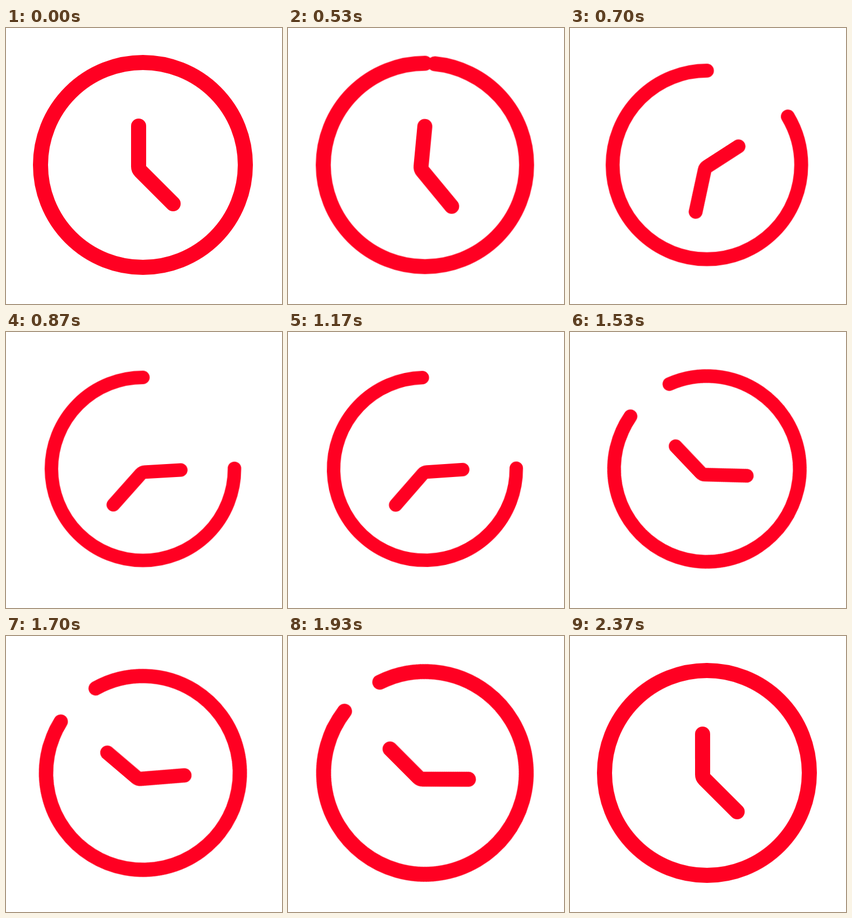
Write an HTML page that moves like this. It is 512 by 512 pixels and loops after 2.4 s.

```html
<!DOCTYPE html>
<html lang="en">
<head>
<meta charset="utf-8">
<title>Clock</title>
<style>
  html, body { margin: 0; width: 100%; height: 100%; overflow: hidden; background: #fff; }
  svg { display: block; width: 100%; height: 100%; }

  .clock {
    fill: none;
    stroke: #ff0022;
    stroke-width: 28px;
    stroke-linecap: round;
    stroke-linejoin: round;
  }
  .clock, .ring, .hands {
    transform-origin: 254px 254px;
    animation: 2400ms cubic-bezier(.833, 0, .167, 1) infinite;
  }
  .clock { animation-name: breathe; }
  .ring { stroke-dasharray: 360px 360px; animation-name: gap; }
  .hands { transform-origin: 250px 265px; animation-name: swing; }

  @keyframes breathe {
    0%, 13.89%, 100% { transform: scale(1); }
    41.67% { transform: scale(.891); }
  }
  /* The dash offset opens the ring clockwise from its top, in degrees. */
  @keyframes gap {
    0%, 13.89%, 100% { transform: rotate(0deg); stroke-dashoffset: 0px; }
    43.06% { transform: rotate(0deg); stroke-dashoffset: -93px; }
    70.69% { transform: rotate(-58deg); stroke-dashoffset: -28.8px; }
  }
  @keyframes swing {
    0%, 13.89%, 100% { transform: rotate(0deg); }
    43.06% { transform: rotate(90deg); }
    70.69% { transform: rotate(-49.6deg); }
  }
</style>
</head>
<body>
<svg viewBox="0 0 512 512">
  <g class="clock">
    <path class="ring" pathLength="360" d="M254 64a190 190 0 0 1 0 380a190 190 0 0 1 0-380"/>
    <path class="hands" d="M246 182V257Q246 262 249.5 265.5L310 326"/>
  </g>
</svg>
</body>
</html>
```
